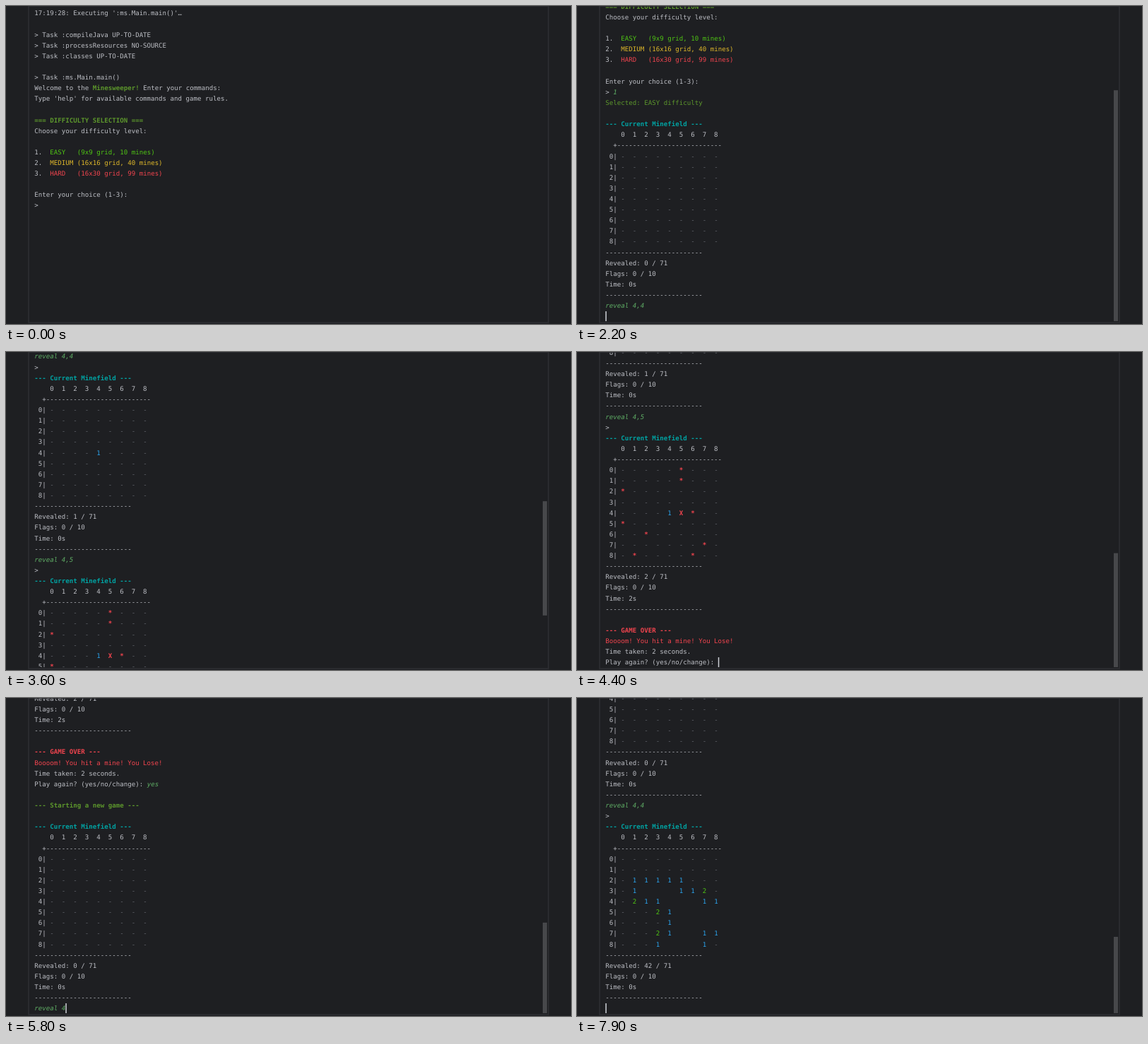
Write an HTML page with a canvas that moves like this. It is 800 px wide and 450 px high and loops after 8 s.

```html
<!DOCTYPE html>
<html lang="en">
<head>
<meta charset="utf-8">
<title>Minesweeper console</title>
<style>
  html, body { margin: 0; width: 100%; height: 100%; overflow: hidden; background: #1e1f22; }
  canvas { display: block; }
</style>
</head>
<body>
<canvas id="stage" width="800" height="450"></canvas>
<script>
const ctx = document.getElementById('stage').getContext('2d');
const LOOP = 8000, LEFT = 40.3, COL = 5.5, LINE = 15.12, BASE = 13.3;
const VIEW = { x: 33, y: 1, w: 734, h: 445 };
const FONT = '9.136px "DejaVu Sans Mono", monospace';

// "~x" inside a line switches to style x; "~i" starts what the player types.
const STYLES = {
  n: ['#bcbec4'], d: ['#63666c'], g: ['#5c962c'], G: ['#5c962c', 'bold '],
  e: ['#4fc414'], y: ['#dfb82a'], r: ['#f0444e'], R: ['#f0444e', 'bold '],
  c: ['#00a3a3', 'bold '], b: ['#2ba3ec'], i: ['#5fad65', 'italic ']
};
const CELL_STYLE = { '-': 'd', '1': 'b', '2': 'e', '*': 'R', 'X': 'R', ' ': 'n' };
const HIDDEN = '-'.repeat(9);
const RULE = '-'.repeat(25);

function board(revealed, seconds, cells = {}) {
  const rows = Array.from({ length: 9 }, (_, r) =>
    ` ${r}| ` + [...(cells[r] || HIDDEN)].map(c => `~${CELL_STYLE[c]}${c}  `).join(''));
  return ['~c--- Current Minefield ---', '    0  1  2  3  4  5  6  7  8', '  +' + '-'.repeat(27),
    ...rows, RULE, `Revealed: ${revealed} / 71`, 'Flags: 0 / 10', `Time: ${seconds}s`, RULE];
}

const lines = [
  "17:19:28: Executing ':ms.Main.main()'…", '',
  '> Task :compileJava UP-TO-DATE', '> Task :processResources NO-SOURCE',
  '> Task :classes UP-TO-DATE', '', '> Task :ms.Main.main()',
  'Welcome to the ~GMinesweeper!~n Enter your commands:',
  "Type 'help' for available commands and game rules.", '',
  '~G=== DIFFICULTY SELECTION ===', 'Choose your difficulty level:', '',
  '1.  ~eEASY   (9x9 grid, 10 mines)', '2.  ~yMEDIUM (16x16 grid, 40 mines)',
  '3.  ~rHARD   (16x30 grid, 99 mines)', '', 'Enter your choice (1-3):',
  '> ~i1', '~gSelected: EASY difficulty', '',
  ...board(0, 0), '~ireveal 4,4', '~i~n>',
  ...board(1, 0, { 4: '----1----' }), '~ireveal 4,5', '~i~n>',
  ...board(2, 2, { 0: '-----*---', 1: '-----*---', 2: '*--------', 4: '----1X*--',
    5: '*--------', 6: '--*------', 7: '-------*-', 8: '-*----*--' }),
  '', '~R--- GAME OVER ---', '~rBoooom! You hit a mine! You Lose!',
  'Time taken: 2 seconds.', 'Play again? (yes/no/change): ~iyes', '',
  '~G--- Starting a new game ---', '',
  ...board(0, 0), '~ireveal 4,4', '~i~n>',
  ...board(42, 0, { 2: '-11111---', 3: '-1   112-', 4: '-211   11', 5: '---21    ',
    6: '----1    ', 7: '---21  11', 8: '---1   1-' }),
  ''
];

// [time, line of the caret, scroll duration, then pairs of typing time and text]
const steps = [
  [0, 18, 0, 900, '1'],
  [1000, 38, 200, 1500, 'r', 1600, 're', 1700, 'rev', 1800, 'revea', 1900, 'reveal ',
    2100, 'reveal 4,4'],
  [2200, 39, 0],
  [2250, 57, 250, 2600, 'r', 2700, 're', 2800, 'rev', 2900, 'reve', 3000, 'revea',
    3100, 'reveal ', 3300, 'reveal 4', 3400, 'reveal 4,5'],
  [3460, 58, 0],
  [3500, 80, 400, 4600, 'yes'],
  [4660, 81, 0],
  [4700, 101, 200, 5000, 'r', 5100, 're', 5200, 'reve', 5400, 'revea', 5500, 'reveal ',
    5700, 'reveal 4', 5900, 'reveal 4,', 6100, 'reveal 4,4'],
  [6400, 102, 0],
  [6440, 120, 340, 6800, 'f', 7200, 'fla', 7300, 'flag ', 7700, 'fla', 7800, 'f', 7900, '']
];
const caretOff = [[0, 100], [600, 900], [4200, 4400]];

const bottom = line => Math.max(0, line * LINE - 429);

function stateAt(t) {
  const now = t + 8;
  const k = steps.findLastIndex(s => s[0] <= now);
  const [start, line, dur, ...keys] = steps[k];
  let typed = '';
  for (let i = 0; i < keys.length; i += 2) if (keys[i] <= now) typed = keys[i + 1];
  const to = bottom(line), from = k ? bottom(steps[k - 1][1]) : to;
  const u = dur ? Math.min(1, Math.max(0, (t - start) / dur)) : 1;
  const scroll = from + (to - from) * (1 - (1 - u) ** 1.71);
  const caret = !caretOff.some(([a, b]) => now >= a + 8 * !a && now < b);
  return { line, typed, scroll, caret: caret && now >= 100 };
}

// Draws one styled line and returns the column after it.
function drawLine(text, y) {
  let col = 0;
  ('n' + text).split('~').forEach(part => {
    const [color, face = ''] = STYLES[part[0]];
    const run = part.slice(1);
    ctx.fillStyle = color;
    ctx.font = face + FONT;
    ctx.fillText(run, LEFT + col * COL, y);
    col += run.length;
  });
  return col;
}

function draw(t) {
  const { line, typed, scroll, caret } = stateAt(t);
  ctx.fillStyle = '#1e1f22';
  ctx.fillRect(0, 0, 800, 450);
  ctx.strokeStyle = '#2a2b2f';
  ctx.lineWidth = 2;
  ctx.strokeRect(32, 0, 736, 448);

  ctx.save();
  ctx.beginPath();
  ctx.rect(VIEW.x, VIEW.y, VIEW.w, VIEW.h);
  ctx.clip();
  ctx.textRendering = 'geometricPrecision';
  for (let i = Math.max(0, Math.floor(scroll / LINE) - 1); i <= line; i++) {
    const y = BASE + i * LINE - scroll;
    if (y > 465) break;
    if (i < line) { drawLine(lines[i], y); continue; }
    const col = drawLine(lines[i].split('~i')[0] + '~i' + typed, y);
    if (caret) {
      ctx.fillStyle = '#ced0d6';
      ctx.fillRect(LEFT + col * COL, y - 10.3, 1.5, 14);
    }
  }
  ctx.restore();

  const scale = VIEW.h / ((line + 1) * LINE);
  if (scale < 1) {
    ctx.fillStyle = '#47484b';
    const top = VIEW.y + scroll * scale;
    ctx.fillRect(760, top, 6, Math.min(VIEW.h * scale, 446 - top));
  }
}

const origin = performance.now();
function tick() {
  draw((performance.now() - origin) % LOOP);
  requestAnimationFrame(tick);
}
tick();
</script>
</body>
</html>
```
